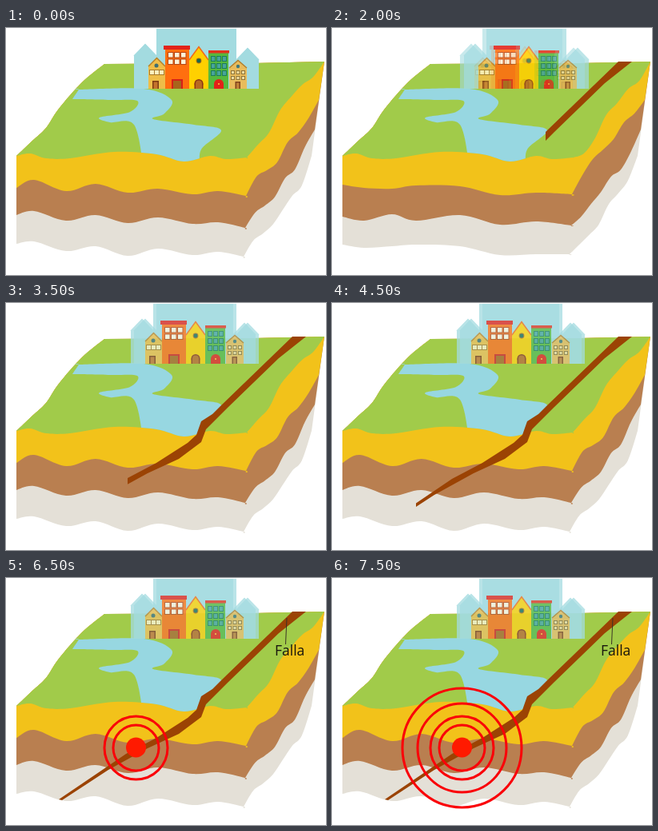
An HTML page with a canvas that plays this animation: 400 by 309 pixels, repeating every 8000 ms.

```html
<!DOCTYPE html>
<html lang="es">
<head>
<meta charset="utf-8">
<style>
html, body { margin: 0; width: 100%; height: 100%; overflow: hidden; background: #fff; }
canvas { display: block; width: 100vw; height: 100vh; }
</style>
</head>
<body>
<canvas id="stage" width="400" height="309"></canvas>
<script>
const main = document.getElementById('stage').getContext('2d');
let c = main;

const STEP = 500, STEPS = 16;
const SKY = '#a3dbe0';

const pairs = p => p.flatMap((v, i) => i % 2 ? [] : [[v, p[i + 1]]]);

// Smooth curve through points; a repeated point makes a corner.
function curve(pts) {
  const at = i => pts[Math.max(0, Math.min(pts.length - 1, i))];
  c.lineTo(...pts[0]);
  for (let i = 0; i < pts.length - 1; i++) {
    const [a, b, d, e] = [at(i - 1), at(i), at(i + 1), at(i + 2)];
    c.bezierCurveTo(b[0] + (d[0] - a[0]) / 6, b[1] + (d[1] - a[1]) / 6,
      d[0] - (e[0] - b[0]) / 6, d[1] - (e[1] - b[1]) / 6, ...d);
  }
}

function poly(color, ...p) {
  c.fillStyle = color;
  c.beginPath();
  pairs(p).forEach(q => c.lineTo(...q));
  c.fill();
}

function rect(color, x, y, w, h) {
  c.fillStyle = color;
  c.fillRect(x, y, w, h);
}

function disc(color, x, y, r) {
  c.fillStyle = color;
  c.beginPath();
  c.arc(x, y, r, 0, 7);
  c.fill();
}

function line(color, width, ...p) {
  c.strokeStyle = color;
  c.lineWidth = width;
  c.beginPath();
  pairs(p).forEach(q => c.lineTo(...q));
  c.stroke();
}

function windows(frame, pane, x, y, cols, rows, w, h, dx, dy) {
  for (let i = 0; i < cols; i++)
    for (let j = 0; j < rows; j++) {
      rect(frame, x + i * dx - 1, y + j * dy - 1, w + 2, h + 2);
      rect(pane, x + i * dx, y + j * dy, w, h);
    }
}

function arch(color, x, y, w) {
  disc(color, x + w / 2, y + w / 2, w / 2);
  rect(color, x, y + w / 2, w, 76 - y - w / 2);
}

function gable(wall, roof, x, w, eave, top) {
  const mid = x + w / 2;
  poly(wall, x, 76, x, eave, mid, top, x + w, eave, x + w, 76);
  line(roof, 1.5, x, eave, mid, top + .5, x + w, eave);
}

// Lower edges of the strata: heights along the front, then along the side.
const calm = {
  x: [13, 35, 75, 112, 152, 190, 233, 265],
  grey: [270, 267, 279, 273, 285, 276, 284, 280],
  greySide: [286, 266, 257, 246, 228, 210, 197, 160],
  brown: [234, 229, 241, 234, 244, 237, 245, 243],
  brownSide: [250, 231, 222, 211, 188, 177, 149, 127],
  yellow: [200, 190, 204, 195, 206, 201, 208, 204],
  yellowSide: [210, 186, 178, 168, 143, 131, 113, 90],
  greenSide: [162, 146, 131, 103, 86, 71, 61, 42]
};
const shaken = {
  x: [13, 40, 75, 105, 160, 210, 255],
  grey: [271, 275, 273, 271, 273, 284, 283],
  greySide: [283, 271, 259, 246, 221, 207, 191, 160],
  brown: [236, 241, 233, 241, 234, 246, 242],
  brownSide: [247, 236, 220, 205, 186, 177, 155, 127],
  yellow: [196, 200, 201, 197, 198, 209, 206],
  yellowSide: [208, 184, 164, 152, 139, 118, 107, 90],
  greenSide: [162, 157, 138, 109, 94, 76, 66, 42]
};
const meadow = pairs([13,160, 30,157, 50,163, 80,163, 135,155, 188,158, 222,167, 255,160, 275,164]);
const backEdge = pairs([123,45, 95,68, 66,101, 50,125, 33,141, 13,160]);
const river = pairs([83,89, 91,77, 91,77, 172,76, 207,90, 198,107, 184,114, 235,121, 269,128, 244,152, 243,175, 243,175,
  172,175, 172,175, 160,121, 130,118, 117,112, 155,105, 164,91, 130,90, 83,89]);

const strata = [
  { name: 'grey', color: '#e4e0d7', from: 297, to: 382 },
  { name: 'brown', color: '#b97f50', from: 299, to: 386 },
  { name: 'yellow', color: '#f2c21a', from: 300, to: 391 },
  { name: 'green', color: '#a1cb4a', from: 301, to: 398 }
];

function land(shape) {
  for (const { name, color, from, to } of strata) {
    const front = shape[name] ? shape.x.map((x, i) => [x, shape[name][i]]) : meadow;
    const side = shape[name + 'Side'].map((y, i) => [from + (to - from) * i / 7, y]);
    c.save();
    c.fillStyle = color;
    c.beginPath();
    curve([...front, side[0], ...side]);
    c.lineTo(398, 42);
    c.lineTo(310, 44);
    curve(backEdge);
    c.fill();
    if (name === 'green') {
      c.clip();
      c.fillStyle = '#97d7e1';
      c.beginPath();
      curve(river);
      c.fill();
    }
    c.restore();
  }
}

function skyline() {
  rect(SKY, 188, 1, 100, 75);
  gable(SKY, SKY, 160, 28, 35, 20);
  gable(SKY, SKY, 288, 28, 40, 25);
}

function houses() {
  gable('#efbd48', '#b98127', 178, 21, 48, 37);
  disc('#3f6f71', 188, 47, 2.5);
  windows('#a77a2b', '#fff0bd', 180, 53, 3, 1, 5, 5, 6, 0);
  rect('#7e3b13', 183, 66, 8, 10);
  rect('#c4732c', 184.5, 67.5, 5, 8.5);

  rect('#ff6f0f', 199, 25, 30, 51);
  rect('#e2231a', 197, 22, 33, 5);
  windows('#b54413', '#fff3d8', 203, 31, 3, 2, 5.5, 5.5, 8, 8.5);
  rect('#d5201a', 207, 64, 14, 12);
  rect('#a8651b', 209, 66, 10, 10);

  gable('#ffd000', '#f1691b', 229, 24, 40, 23);
  disc('#a46b17', 241, 41, 3.4);
  disc('#17684f', 241, 41, 2.4);
  arch('#8a3515', 235.5, 64, 11);
  arch('#b96a20', 237, 65.5, 8);

  rect('#56b83d', 253, 31, 25, 45);
  rect('#e2321d', 253, 28, 26, 3.5);
  windows('#1c7d59', '#48a49a', 257, 36, 3, 3, 4, 5, 7, 9);
  arch('#e32218', 260, 64, 12);
  disc('#ffd23a', 266, 70, 1);

  gable('#e9bc5c', '#b1802f', 279, 22, 50, 40);
  disc('#40777a', 290, 48, 2.2);
  windows('#8c7339', '#f2dda0', 282, 54, 3, 2, 3, 3, 6.5, 7);
  rect('#80431d', 286.5, 67, 6.5, 9);
  rect('#c08037', 288, 68.5, 3.5, 7.5);
}

function layer(...parts) {
  const sheet = document.createElement('canvas');
  sheet.width = 400;
  sheet.height = 309;
  c = sheet.getContext('2d');
  parts.forEach(f => f());
  c = main;
  return sheet;
}
const town = layer(skyline, houses);
const backdrop = layer(skyline);

function stamp(sheet, dx, alpha) {
  c.globalAlpha = alpha;
  c.drawImage(sheet, dx, 0);
  c.globalAlpha = 1;
}

// Left end of the crack at each step
const reach = [400, 324, 307, 288, 267, 238, 195, 152, 128, 105, 66];

function fault(left) {
  c.save();
  c.beginPath();
  c.rect(left, 0, 400, 309);
  c.clip();
  poly('#9b4304',
    358,42, 268,129, 258,139, 244,148, 238,165, 227,175, 188,200, 150,220, 66,277,
    70,278, 128,240, 177,213, 216,195, 244,174, 250,158, 278,130, 341,69, 375,42);
  c.restore();
}

function label() {
  line('#3b3325', 1, 351, 50, 349.5, 83);
  c.fillStyle = '#17150d';
  c.font = '500 17.5px "Open Sans", "Noto Sans", sans-serif';
  c.fillText('Falla', 336, 97);
}

function quake(rings) {
  disc('#ff1a00', 162.5, 212, 12.5);
  c.strokeStyle = '#fa0008';
  c.lineWidth = 3;
  [28.5, 39.5, 55.5, 74.5].slice(0, rings).forEach(r => {
    c.beginPath();
    c.arc(162.5, 212.5, r, 0, 7);
    c.stroke();
  });
}

function draw(step) {
  const right = step > 0 && step % 2 === 0;
  c.clearRect(0, 0, 400, 309);
  land(right ? shaken : calm);
  if (step === 0) stamp(town, 0, 1);
  else if (right) {
    stamp(town, 0, .6);
    stamp(town, 5, .72);
  } else {
    stamp(backdrop, 0, .75);
    stamp(town, -4, .76);
  }
  fault(reach[Math.min(step, 10)]);
  if (step >= 10) label();
  if (step >= 11) quake(step - 11);
}

let start;
function tick(now) {
  start ??= now;
  draw(Math.floor((now - start) / STEP) % STEPS);
  requestAnimationFrame(tick);
}
draw(0);
requestAnimationFrame(tick);
</script>
</body>
</html>
```
